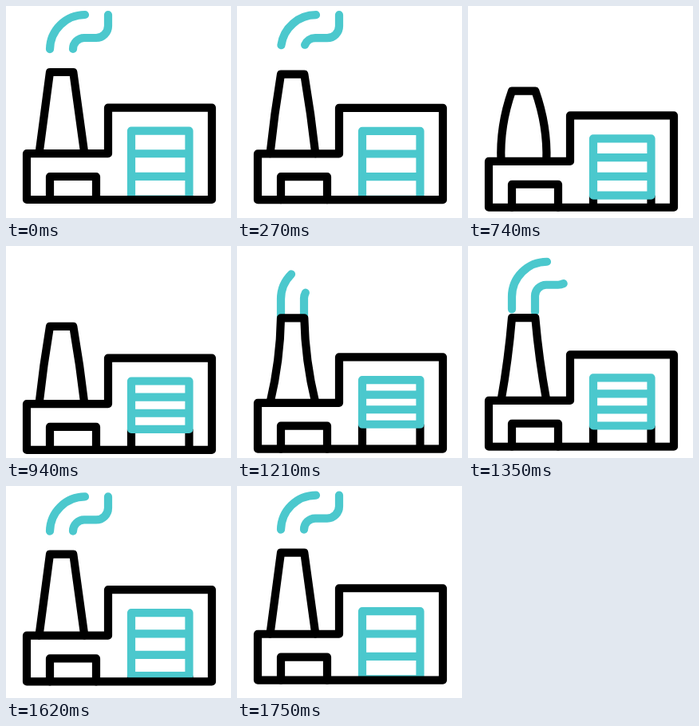
These frames come from a looping animation (282x266 px, 1.82 s). An HTML page with a canvas:

```html
<!DOCTYPE html>
<html lang="en">
<head>
<meta charset="utf-8">
<title>Factory</title>
<style>
html, body { margin: 0; width: 100%; height: 100%; overflow: hidden; background: #fff; }
canvas { display: block; width: 282px; height: 266px; }
</style>
</head>
<body>
<canvas id="stage"></canvas>
<script>
const W = 282, H = 266, LOOP = 1820;
const BLACK = '#000', TEAL = '#4bc8cd', LINE = 10.2;
const canvas = document.getElementById('stage');
const ctx = canvas.getContext('2d');
const dpr = window.devicePixelRatio || 1;
canvas.width = W * dpr;
canvas.height = H * dpr;

// Each track is a list of [time, value], eased between neighbours.
const tracks = {
  sink: [[205, 0], [1020, 13.2], [1860, 0]],
  squash: [[120, 0], [690, 14.3], [1190, -4.3], [1480, 0.3], [1820, 0]],
  bulge: [[120, 0], [690, 9], [1190, -6], [1480, 0]],
  door: [[350, 86], [1150, 55.5], [1190, 55.5], [1820, 86]]
};
const plumes = [
  {
    rest: 0.295, grow: [992, 1370], lift: [1210, 1543], length: 29 + 44 * Math.PI / 2,
    trace(base) {
      ctx.moveTo(55, base);
      ctx.lineTo(55, 55);
      ctx.arc(99, 55, 44, Math.PI, Math.PI * 1.5);
    }
  },
  {
    rest: 0.28, grow: [992, 1562], lift: [1210, 1615], length: 58 + 29 * Math.PI / 2,
    trace(base) {
      ctx.moveTo(84, base);
      ctx.lineTo(84, 54);
      ctx.arc(98, 54, 14, Math.PI, Math.PI * 1.5);
      ctx.lineTo(113, 40);
      ctx.arc(113, 25, 15, Math.PI / 2, 0, true);
      ctx.lineTo(128, 11);
    }
  }
];

const ease = x => (1 - Math.cos(Math.PI * Math.min(1, Math.max(0, x)))) / 2;
const ramp = (t, [from, to]) => ease((t - from) / (to - from));

function sample(track, t) {
  let value = track[0][1];
  for (let i = 1; i < track.length; i++) {
    const [t0, v0] = track[i - 1], [t1, v1] = track[i];
    if (t >= t0) value = v0 + (v1 - v0) * ramp(t, [t0, t1]);
  }
  return value;
}

function stroke(color, trace, cap = 'round') {
  ctx.strokeStyle = color;
  ctx.lineCap = cap;
  ctx.beginPath();
  trace();
  ctx.stroke();
}

function poly(...pts) {
  for (let i = 0; i < pts.length; i += 2) ctx.lineTo(pts[i], pts[i + 1]);
}

function drawSmoke(t, squash) {
  const fading = t < 900;
  for (const p of plumes) {
    const start = fading
      ? p.rest + (1 - p.rest) * ramp(t, [180, 635])
      : p.rest * ramp(t, p.lift);
    const end = fading ? 1 : ramp(t, p.grow);
    if (end - start < 0.001) continue;
    const total = p.length + squash;
    ctx.setLineDash([(end - start) * total, 2 * total]);
    ctx.lineDashOffset = -start * total;
    stroke(TEAL, () => p.trace(83 + squash));
  }
  ctx.setLineDash([]);
}

function drawChimney(squash, bulge) {
  const top = 83 + squash, mid = (top + 185) / 2;
  stroke(BLACK, () => {
    ctx.moveTo(41.5, 185);
    ctx.quadraticCurveTo(48.2 - bulge, mid, 55, top);
    ctx.lineTo(84.3, top);
    ctx.quadraticCurveTo(91.3 + bulge, mid, 98.3, 185);
  });
}

function drawShutter(height) {
  const left = 157, right = 229.5, top = 156.6, bottom = top + height;
  stroke(BLACK, () => {
    for (const x of [left, right]) {
      ctx.moveTo(x, bottom);
      ctx.lineTo(x, 243);
    }
  }, 'butt');
  stroke(TEAL, () => {
    ctx.rect(left, top, right - left, height);
    for (const k of [1, 2]) {
      const y = top + height * k / 3;
      ctx.moveTo(left, y);
      ctx.lineTo(right, y);
    }
  });
}

function drawBuilding() {
  stroke(BLACK, () => {
    poly(26, 243, 26, 185.2, 128, 185.2, 128, 127.7, 258, 127.7, 258, 243);
    ctx.closePath();
  });
  stroke(BLACK, () => poly(55, 243, 55, 214, 113, 214, 113, 243));
}

function draw(t) {
  const squash = sample(tracks.squash, t);
  ctx.setTransform(dpr, 0, 0, dpr, 0, 0);
  ctx.fillStyle = '#fff';
  ctx.fillRect(0, 0, W, H);
  ctx.translate(0, sample(tracks.sink, t));
  ctx.lineWidth = LINE;
  ctx.lineJoin = 'round';
  drawSmoke(t, squash);
  drawChimney(squash, sample(tracks.bulge, t));
  drawShutter(sample(tracks.door, t));
  drawBuilding();
}

const began = performance.now();
function tick() {
  draw((performance.now() - began) % LOOP);
  requestAnimationFrame(tick);
}
tick();
</script>
</body>
</html>
```
